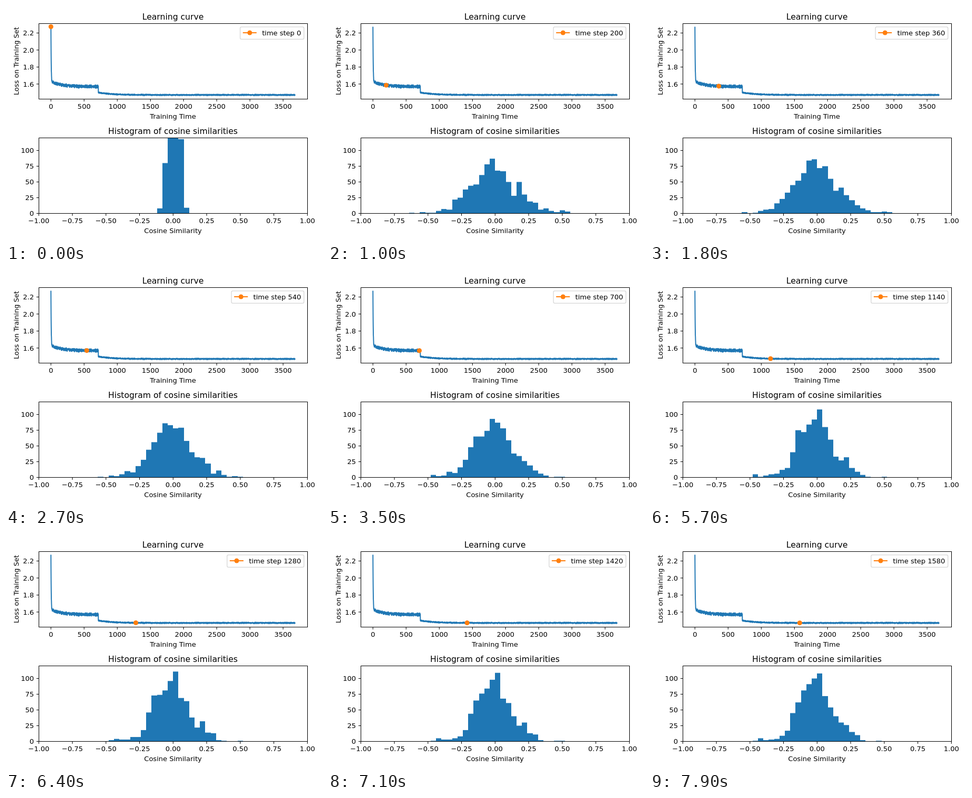
An HTML page with a canvas that plays this animation: 600 px wide and 450 px high, repeating every 8000 ms.

```html
<!DOCTYPE html>
<html lang="en">
<head>
<meta charset="utf-8">
<title>Learning curve</title>
<style>
  html, body { margin: 0; width: 100%; height: 100%; overflow: hidden; background: #fff; }
  canvas { display: block; width: 600px; height: 450px; }
</style>
</head>
<body>
<canvas id="stage" width="600" height="450"></canvas>
<script>
const ctx = document.getElementById('stage').getContext('2d');
const BLUE = '#1f77b4', ORANGE = '#ff7f0e';
const LOOP = 8000, TICK = 100, STEPS_PER_TICK = 20, LAST_STEP = 3680;
const PT = 1.302, FONT = 10 * PT;
const LEFT = 62, WIDTH = 510, HEIGHT = 144, TOP1 = 33, TOP2 = 251;

// Bar counts at key steps: `first` is the bin of the first count, `stray` a lone bin of one.
const KEYS = [
  { step: 0, first: 22, counts: [8, 80, 285, 280, 118, 9] },
  { step: 200, first: 11, stray: 9, counts: [2, 1, 1, 4, 7, 6, 22, 25, 38, 44, 46, 61, 78, 87,
    68, 67, 50, 28, 50, 30, 19, 17, 6, 8, 4, 2, 5, 3] },
  { step: 540, first: 13, stray: 11, counts: [3, 2, 5, 10, 8, 18, 28, 44, 56, 71, 86, 83,
    78, 79, 58, 40, 32, 31, 22, 6, 11, 4, 1, 2, 1] },
  { step: 860, first: 13, stray: 37, counts: [5, 2, 1, 9, 6, 12, 24, 48, 71, 64, 67, 105,
    99, 76, 60, 31, 40, 23, 14, 17, 2, 3] },
  { step: 1140, first: 13, stray: 37, counts: [5, 1, 3, 5, 6, 12, 15, 40, 75, 72, 84, 92,
    108, 80, 60, 33, 27, 32, 15, 9, 4, 1] },
  { step: 1280, first: 13, stray: 37, counts: [2, 4, 3, 3, 7, 7, 18, 46, 73, 74, 81, 96,
    111, 69, 64, 38, 22, 32, 14, 13, 2, 1] },
  { step: 1580, first: 13, stray: 36, counts: [1, 5, 2, 3, 4, 9, 17, 45, 62, 81, 91, 100,
    108, 72, 54, 40, 30, 26, 15, 10, 2] }
];

// Repeatable noise in -1..1
function noise(n) {
  const s = Math.sin(n * 12.9898 + 4.137) * 43758.5453;
  return 2 * (s - Math.floor(s)) - 1;
}

const lossX = step => 85.3 + step * 0.12594;
const lossY = loss => 148.8 - (loss - 1.6) * 162.2;

function loss(step) {
  return step < 715
    ? 1.568 + 0.06 * Math.exp(-step / 170) + 0.646 * Math.exp(-step / 4)
    : 1.472 + 0.028 * Math.exp((715 - step) / 200);
}

const curve = new Path2D();
for (let n = 0; n <= LAST_STEP; n++) {
  const spread = n < 5 ? 0 : n < 715 ? 0.011 : 0.0045;
  curve.lineTo(lossX(n), lossY(loss(n) + spread * (noise(n) + noise(n + 5000))));
}

function countAt(key, bin) {
  return bin === key.stray ? 1 : key.counts[bin - key.first] || 0;
}

function barCount(bin, step) {
  let k = 0;
  while (k < KEYS.length - 2 && step >= KEYS[k + 1].step) k++;
  const a = KEYS[k], b = KEYS[k + 1];
  let w = (step - a.step) / (b.step - a.step);
  // The first spread is quick, while the loss falls steeply.
  if (k === 0) w = (1 - Math.exp(-6 * w)) / (1 - Math.exp(-6));
  const mean = countAt(a, bin) * (1 - w) + countAt(b, bin) * w;
  const sway = 2 * Math.sqrt(w * (1 - w)) * Math.sqrt(mean) * 0.4;
  return Math.round(mean + sway * noise(bin * 31 + step));
}

function text(str, x, y, align = 'center', size = FONT) {
  ctx.font = `${size}px "DejaVu Sans", sans-serif`;
  ctx.textAlign = align;
  ctx.fillStyle = '#000';
  ctx.fillText(str, x, y);
}

function line(x1, y1, x2, y2) {
  ctx.beginPath();
  ctx.moveTo(x1, y1);
  ctx.lineTo(x2, y2);
  ctx.stroke();
}

function marker(x, y) {
  ctx.fillStyle = ORANGE;
  ctx.beginPath();
  ctx.arc(x, y, 3.5 * PT, 0, 2 * Math.PI);
  ctx.fill();
}

function axes(top, title, label, xTicks, yTicks) {
  const bottom = top + HEIGHT + 0.5;
  ctx.strokeStyle = '#000';
  ctx.lineWidth = 1.04;
  ctx.strokeRect(LEFT + 0.5, top + 0.5, WIDTH, HEIGHT);
  for (const [str, x] of xTicks) {
    line(x, bottom, x, bottom + 4.6);
    text(str, x, bottom + 18.8);
  }
  for (const [str, y] of yTicks) {
    line(LEFT + 0.5, y, LEFT - 4.1, y);
    text(str, LEFT - 9, y + 4.8, 'right');
  }
  text(title, LEFT + WIDTH / 2, top - 7.5, 'center', 12 * PT);
  text(label, LEFT + WIDTH / 2, bottom + 37.4);
}

const range = (n, f) => Array.from({ length: n }, (_, i) => f(i));
const lossTicks = [
  range(8, i => [i * 500, lossX(i * 500)]),
  range(4, i => [(1.6 + i * 0.2).toFixed(1), lossY(1.6 + i * 0.2)])
];
const histTicks = [
  range(9, i => [(i / 4 - 1).toFixed(2).replace('-', '\u2212'), LEFT + 0.3 + i * WIDTH / 8]),
  range(5, i => [i * 25, TOP2 + HEIGHT + 0.5 - i * 30])
];

function legend(step) {
  const label = `time step ${step}`;
  ctx.font = `${FONT}px "DejaVu Sans", sans-serif`;
  const x = 560.3 - ctx.measureText(label).width;
  ctx.beginPath();
  ctx.roundRect(x - 41.6, 39.8, 607.3 - x, 23.6, 2.6);
  ctx.fillStyle = 'rgba(255,255,255,.8)';
  ctx.fill();
  ctx.strokeStyle = 'rgba(204,204,204,.8)';
  ctx.lineWidth = PT;
  ctx.stroke();
  ctx.strokeStyle = ORANGE;
  ctx.lineWidth = 1.5 * PT;
  line(x - 36.5, 51, x - 10.4, 51);
  marker(x - 23.4, 51);
  text(label, x, 55.5, 'left');
}

function bars(step) {
  ctx.fillStyle = BLUE;
  const base = TOP2 + HEIGHT + 0.5, edge = i => Math.round(LEFT + 0.2 + i * WIDTH / 50);
  for (let i = 0; i < 50; i++) {
    const h = Math.min(barCount(i, step) * 1.2, HEIGHT);
    if (h > 0) ctx.fillRect(edge(i), base - h, edge(i + 1) - edge(i), h);
  }
}

function draw(now) {
  const step = Math.floor((now % LOOP) / TICK) * STEPS_PER_TICK;
  ctx.fillStyle = '#fff';
  ctx.fillRect(0, 0, 600, 450);

  ctx.strokeStyle = BLUE;
  ctx.lineWidth = 1.5 * PT;
  ctx.lineJoin = 'round';
  ctx.stroke(curve);
  marker(lossX(step), lossY(loss(step)));
  axes(TOP1, 'Learning curve', 'Training Time', ...lossTicks);
  ctx.save();
  ctx.translate(23.7, TOP1 + HEIGHT / 2);
  ctx.rotate(-Math.PI / 2);
  text('Loss on Training Set', 0, 0);
  ctx.restore();
  legend(step);

  bars(step);
  axes(TOP2, 'Histogram of cosine similarities', 'Cosine Similarity', ...histTicks);
}

const start = performance.now();
function frame() {
  draw(performance.now() - start);
  requestAnimationFrame(frame);
}
frame();
</script>
</body>
</html>
```
